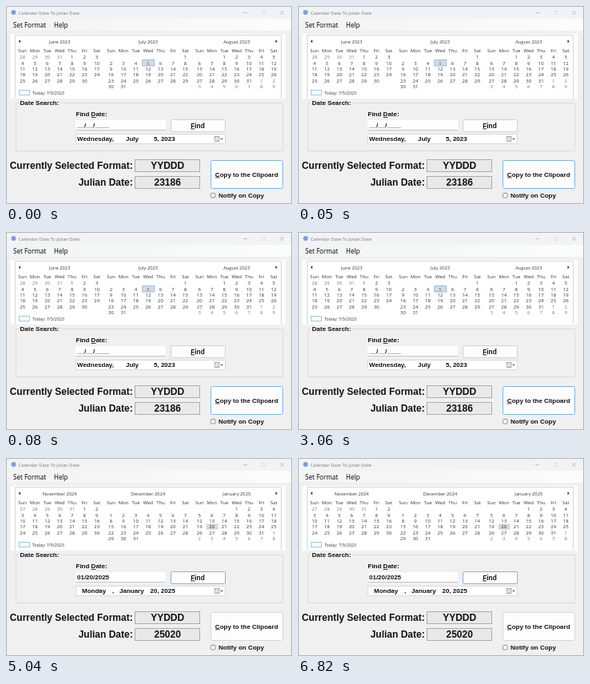
An HTML page that plays this animation: 358 px wide and 248 px high, repeating every 8000 ms.

```html
<!DOCTYPE html>
<html lang="en">
<head>
<meta charset="utf-8">
<title>Calendar Date To Julian Date</title>
<style>
  html, body { margin: 0; width: 100%; height: 100%; overflow: hidden; background: #f0f0f0; }
  svg { display: block; }
  text { font: bold 8px "Liberation Sans", Arial, sans-serif; fill: #111; white-space: pre; }
  .ui { font: 5.75px "Open Sans", "Noto Sans", sans-serif; fill: #333; }
  .day { font-size: 6px; }
  .menu { font-size: 8.1px; font-weight: 500; fill: #000; }
  .big { font-size: 12px; }
  .key { text-decoration: underline; }
</style>
</head>
<body>
<svg id="stage" width="358" height="248" viewBox="0 0 358 248"></svg>
<script>
const LOOP = 8000, SEARCH_AT = 5040;
const DAY_NAMES = ["Sun", "Mon", "Tue", "Wed", "Thu", "Fri", "Sat"];
const COLUMN = 15.5, ROW = 7.4, MONTH = 110.8;
const FOCUS = "#7db6ea";

const states = [
  { year: 2023, month: 5, selected: [2023, 6, 5], typed: "__/__/____", julian: "23186", copyFocused: true,
    picker: [[89, "Wednesday,"], [150, "July"], [185, "5, 2023"]] },
  { year: 2024, month: 10, selected: [2025, 0, 20], typed: "01/20/2025", julian: "25020", copyFocused: false,
    picker: [[95, "Monday"], [133, ","], [142, "January"], [180.5, "20, 2025"]] }
];

const rect = (x, y, w, h, fill, stroke = "none", extra = "") =>
  `<rect x="${x}" y="${y}" width="${w}" height="${h}" fill="${fill}" stroke="${stroke}" ${extra}/>`;
const path = (d, stroke, fill = "none", width = 1) =>
  `<path d="${d}" stroke="${stroke}" fill="${fill}" stroke-width="${width}"/>`;
const text = (x, y, value, cls = "", anchor = "start", extra = "") =>
  `<text x="${x}" y="${y}" class="${cls}" text-anchor="${anchor}" ${extra}>${value}</text>`;
const key = letter => `<tspan class="key">${letter}</tspan>`;

function monthView(year, month, index, selected) {
  const left = 20.7 + index * MONTH;
  const first = new Date(year, month, 1);
  const next = new Date(year, month + 1, 1);
  // A month that begins on Sunday leaves its first row to the previous month.
  const lead = first.getDay() || 7;
  const title = first.toLocaleString("en-US", { month: "long", year: "numeric" });
  let out = text(left + 3 * COLUMN, 47, title, "ui", "middle");
  DAY_NAMES.forEach((name, i) => out += text(left + i * COLUMN, 58, name, "ui day", "middle"));
  for (let cell = 0; cell < 42; cell++) {
    const date = new Date(year, month, 1 - lead + cell);
    const before = date < first, after = date >= next;
    if ((before && index !== 0) || (after && index !== 2)) continue;
    const x = left + (cell % 7) * COLUMN, y = 66.2 + Math.floor(cell / 7) * ROW;
    let color = before || after ? "#777" : "#333";
    if (date.getTime() === new Date(...selected).getTime()) {
      const today = year === 2023;
      out += rect(x - 7.2, y - 6, 15, 7.4, today ? "#d0dcea" : "#d9d9d9", today ? "#86b0d8" : "none", 'stroke-width=".8"');
      if (today) color = "#c0452f";
    }
    out += text(x, y, date.getDate(), "ui day", "middle", `style="fill:${color}"`);
  }
  return out;
}

function windowFrame() {
  return rect(0, 0, 358, 248, "#f0f0f0") + rect(0, 0, 358, 16, "#f1f3f6") +
    `<linearGradient id="menu"><stop stop-color="#f3f3f3"/><stop offset="1" stop-color="#fcfcfc"/></linearGradient>` +
    rect(0, 16, 358, 15, "url(#menu)") + `<circle cx="9.5" cy="8" r="3" fill="#7d9fd6"/>` +
    text(15.7, 10.8, "Calendar Date To Julian Date", "ui", "start", 'style="fill:#777"') +
    path("M297 8.5h5M343 6l5 5M348 6l-5 5", "#aaa", "none", .7) + path("M320.5 6.5h4v4h-4z", "#d8d8d8", "none", .7) +
    text(9, 26.6, "Set Format", "ui menu") + text(60, 26.6, "Help", "ui menu");
}

function calendar(state) {
  let out = rect(5.5, 35, 344, 81, "#fff") + path("M11.5 115.5V36.5H344.5V115.5", "#d4d8dc") +
    path("M18 42.2v4l-2.2-2z", "none", "#222") + path("M337.5 42.2v4l2.2-2z", "none", "#222");
  for (let i = 0; i < 3; i++) out += monthView(state.year, state.month + i, i, state.selected);
  return out + rect(16.5, 105.5, 13, 6, "#fff", "#80bce8", 'stroke-width=".8"') +
    text(33, 110.8, "Today: 7/5/2023", "ui", "start", 'style="font-size:5.4px"');
}

function search(state) {
  const border = state.copyFocused ? "#d2d2d2" : FOCUS;
  return rect(12.5, 121.5, 334, 60, "none", "#dcdcdc") + rect(16, 118, 52, 7, "#f0f0f0") +
    text(17.5, 124, "Date Search:") + text(87.5, 138, `Find ${key("D")}ate:`) +
    rect(87, 143, 113, 13, "#fff") + path("M87 155.5h113", "#c4c4c4") + text(89, 152, state.typed) +
    rect(206.5, 142.5, 68, 15, "#fdfdfd", border, 'rx="1.5"') +
    text(240, 152.5, key("F") + "ind", "", "middle", 'style="font-size:8.3px"') +
    rect(87.5, 160.5, 187, 12, "#fff", "#dadada") +
    state.picker.map(([x, value]) => text(x, 169, value)).join("") +
    rect(261.5, 163.5, 5.5, 6, "#fff", "#888", 'stroke-width=".7"') +
    path("M261.5 165h5.5M263 167h3M263 168.4h3", "#999", "none", .6) +
    path("M268.3 165.7h3.4l-1.7 2z", "none", "#555");
}

function result(y, label, value) {
  return text(158.7, y + 12, label, "big", "end") + rect(161.5, y + .5, 81, 15, "#e9e9e9", "#adadad") +
    text(202.2, y + 12.3, value, "big", "middle");
}

function actions(state) {
  const border = state.copyFocused ? FOCUS : "#d6d6d6";
  return result(192, "Currently Selected Format:", "YYDDD") + result(213, "Julian Date:", state.julian) +
    rect(256.5, 193.5, 90, 35, "#fdfdfd", border, 'rx="2"') +
    text(301.2, 213.5, key("C") + "opy to the Clipoard", "", "middle") +
    rect(256.5, 234.5, 5.5, 5.5, "#fff", "#777", 'rx="1" stroke-width=".8"') +
    text(266, 240, "Notify on Copy");
}

const scenes = states.map(state =>
  windowFrame() + calendar(state) + search(state) + actions(state) +
  rect(.5, .5, 357, 247, "none", "#b5b5b5"));

const stage = document.getElementById("stage");
const start = performance.now();
let shown = -1;

function draw(now) {
  const time = Math.max(0, now - start) % LOOP;
  const scene = time < SEARCH_AT ? 0 : 1;
  if (scene !== shown) stage.innerHTML = scenes[shown = scene];
  requestAnimationFrame(draw);
}
draw(start);
</script>
</body>
</html>
```
